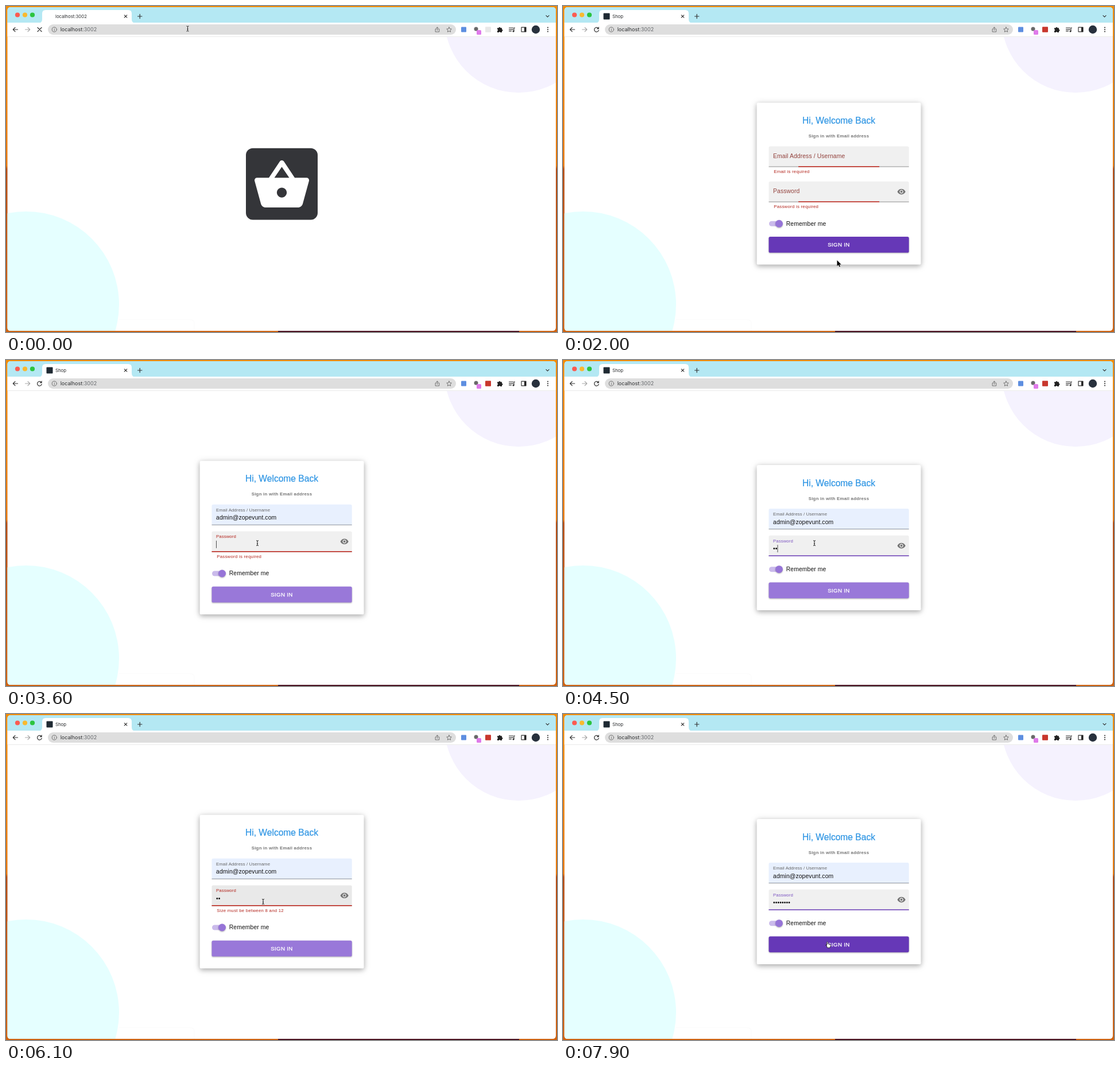
Animation, 960 px wide and 568 px high, one loop 8000 ms. Source, as an HTML page:

```html
<!DOCTYPE html>
<html lang="en">
<head>
<meta charset="utf-8">
<title>Shop sign in</title>
<style>
  html, body { margin: 0; width: 100%; height: 100%; overflow: hidden; }
  svg { display: block; width: 960px; height: 568px; }
  text { font: 10.4px "Liberation Sans", Arial, sans-serif; letter-spacing: .00938em; }
  .ui { font-family: Inter, Roboto, sans-serif; letter-spacing: 0; fill: #2b2d2f; }
  .small { font-size: 7.8px; letter-spacing: .0333em; }
  .line { fill: none; stroke: #333; stroke-width: 1.2; stroke-linecap: round; stroke-linejoin: round; }
  #card { filter: drop-shadow(0 3px 4px rgba(0,0,0,.24)) drop-shadow(0 1px 6px rgba(0,0,0,.14)); }
  .raised { filter: drop-shadow(0 1.3px 1.3px rgba(0,0,0,.3)); }
</style>
</head>
<body>
<svg viewBox="0 0 960 568">
  <defs>
    <linearGradient id="wall" x2="0" y2="1">
      <stop offset="0" stop-color="#f28c08"/>
      <stop offset=".49" stop-color="#e87608"/>
      <stop offset=".5" stop-color="#b54a10"/>
      <stop offset="1" stop-color="#cf6210"/>
    </linearGradient>
    <clipPath id="page"><path d="M2.5 54H958V561Q958 566 953 566H7.5Q2.5 566 2.5 561Z"/></clipPath>
  </defs>

  <rect width="960" height="568" fill="url(#wall)"/>
  <rect x="474" y="560" width="420" height="8" fill="#4a1220"/>
  <rect x="2.5" y="2" width="955.5" height="564" rx="5.5" fill="#fff"/>
  <path d="M2.5 30V7.5Q2.5 2 8 2H952.5Q958 2 958 7.5V30Z" fill="#b4e8f3"/>

  <!-- tab strip -->
  <path d="M57 30Q63 29 63 23V13Q63 7 69 7H213Q219 7 219 13V23Q219 29 225 30Z" fill="#fff"/>
  <rect x="2.5" y="29" width="955.5" height="24" fill="#fff"/>
  <circle cx="20" cy="15.5" r="4.1" fill="#fb5b51"/>
  <circle cx="33" cy="15.5" r="4.1" fill="#f9b92f"/>
  <circle cx="46" cy="15.5" r="4.1" fill="#2bc440"/>
  <rect id="favicon" x="70.5" y="12.5" width="11" height="11" rx="1" fill="#1f2a33"/>
  <text id="tab" class="ui" x="86" y="20.8" style="font-size:7.8px"></text>
  <g class="line">
    <path d="M206.3 15.8l4.4 4.4m0-4.4l-4.4 4.4M229.5 18h7.4M233.2 14.3v7.4M941 16.7l2.5 2.5 2.5-2.5"/>
  </g>

  <!-- toolbar -->
  <rect x="73" y="32" width="711" height="18" rx="9" fill="#dedede"/>
  <g class="line">
    <path d="M20.5 41h-8M16 37.3L12.3 41 16 44.7"/>
    <path d="M33.5 41h8M38 37.3L41.7 41 38 44.7" stroke="#a5a5a5"/>
    <path id="stop" d="M55 37.5l7 7m0-7l-7 7"/>
    <g id="reload"><path d="M61.6 39A3.9 3.9 0 1 0 62.2 42.2"/><path d="M62.4 36.8v3.2h-3.2z" fill="#333" stroke-width=".5"/></g>
    <g stroke="#666" stroke-width=".9">
      <circle cx="84.3" cy="41" r="4.1"/><path d="M84.3 40.7v2.3M84.3 38.9v.1"/>
      <path d="M749.5 40h-1.4v5h6.6v-5h-1.4M751.4 42.5V37m-1.7 1.6l1.7-1.7 1.7 1.7"/>
      <path d="M772 36.9l1.3 2.8 3 .4-2.2 2.1.5 3-2.6-1.5-2.6 1.5.5-3-2.2-2.1 3-.4z"/>
    </g>
    <path d="M876.5 38h7M876.5 40.8h7M876.5 43.6h4M885 44v-6h1.5"/>
    <rect x="898" y="37.2" width="8" height="7.6"/>
  </g>
  <circle cx="884" cy="44" r="1.5" fill="#333"/>
  <path d="M903 37h3v8h-3z" fill="#222"/>
  <text class="ui" x="94.7" y="44.3" style="font-size:9px">localhost<tspan fill="#66696c">:3002</tspan></text>
  <rect x="793" y="36.5" width="9" height="9" rx="1" fill="#5d8ee0"/>
  <circle cx="819" cy="40" r="3.5" fill="#696969"/>
  <rect x="820" y="42" width="8" height="8" rx="1.5" fill="#df7bea"/>
  <rect id="ext" x="835" y="36.2" width="10" height="9.6" rx="1"/>
  <path d="M856 38.3h2.5a1.5 1.5 0 0 1 3 0h2.5v2.5a1.5 1.5 0 0 1 0 3v2.2h-2.7a1.4 1.4 0 0 0-2.7 0H856v-2.7a1.4 1.4 0 0 0 0-2.7z" fill="#222"/>
  <circle cx="923" cy="41" r="7.2" fill="#28313d"/>
  <g fill="#333"><circle cx="944" cy="37.5" r="1.1"/><circle cx="944" cy="41" r="1.1"/><circle cx="944" cy="44.5" r="1.1"/></g>
  <path d="M2.5 53.3H958" stroke="#e3e3e3" stroke-width=".8"/>

  <g clip-path="url(#page)">
    <circle cx="893" cy="22" r="129" fill="#f5f2fe"/>
    <circle cx="35" cy="520" r="162" fill="#e5ffff"/>
    <path d="M197 546.5H321Q328 546.5 328 553V566" fill="none" stroke="#fbfbfb"/>
  </g>

  <g id="splash">
    <rect x="418" y="247.7" width="125" height="124.8" rx="12" fill="#343539"/>
    <path transform="translate(428.7 260.3) scale(4.32)" fill="#fff" d="M17.21 9l-4.38-6.56c-.19-.28-.51-.42-.83-.42-.32 0-.64.14-.83.43L6.79 9H2c-.55 0-1 .45-1 1 0 .09.01.18.04.27l2.54 9.27c.23.84 1 1.46 1.92 1.46h13c.92 0 1.69-.62 1.93-1.46l2.54-9.27L23 10c0-.55-.45-1-1-1h-4.79zM9 9l3-4.4L15 9H9zm3 8c-1.1 0-2-.9-2-2s.9-2 2-2 2 .9 2 2-.9 2-2 2z"/>
  </g>

  <g id="form">
    <rect id="card" x="337.7" width="285.8" rx="2.6" fill="#fff"/>
    <g id="head">
      <text x="480.5" y="219.8" text-anchor="middle" fill="#2a93e3" stroke="#2a93e3" stroke-width=".2" style="font-size:15.6px;letter-spacing:0">Hi, Welcome Back</text>
      <text class="small" x="480.5" y="243.6" text-anchor="middle" fill="#757575" font-weight="700" style="font-weight:700">Sign in with Email address</text>
    </g>
    <g id="email"></g>
    <g id="pass"></g>
    <g id="foot">
      <rect id="track" x="359" y="360.2" width="23.5" height="9" rx="4.5"/>
      <circle id="thumb" class="raised" cx="376.5" cy="364.7" r="6.5"/>
      <text id="remember" x="388.7" y="368.2">Remember me</text>
      <rect id="button" x="358.5" y="387.4" width="244.2" height="27.8" rx="2.6"/>
      <text id="signin" x="480.4" y="404.5" text-anchor="middle" fill="#fff" stroke="#fff" stroke-width=".3" style="font-size:9.75px;letter-spacing:.0286em">SIGN IN</text>
      <circle id="spinner" cx="480.2" cy="401.3" r="6.6" fill="none" stroke="#a3a3a3" stroke-width="1.1" pathLength="360"/>
    </g>
  </g>

  <g id="pointer">
    <path id="arrow" d="M0 0V10.2L2.4 8 4 11.6 5.6 10.9 4.1 7.4H7.3Z" stroke="#fff" stroke-width=".8" paint-order="stroke"/>
    <path id="beam" d="M-2-4.5Q0-4.5 0-3V3Q0 4.5-2 4.5M2-4.5Q0-4.5 0-3M0 3Q0 4.5 2 4.5M-1 .8H1" fill="none" stroke="#111" stroke-width=".9"/>
    <path id="hand" d="M-2.4 1V-4.4Q-1.5-5.9-.6-4.4V-1.2Q.5-2 1-.9 2-1.6 2.5-.5 4-.9 4 .8V2.6Q3.8 4.2 3 5.2H-1.6Q-3-.2-4.4 1 -4.6-.5-2.4 1Z" fill="#fff" stroke="#111" stroke-width=".8" stroke-linejoin="round"/>
  </g>
</svg>

<script>
const LOOP = 8000, STEP = 100, ROW = 14.6;
const ERROR_AT = 1950, FILL_AT = 3000, FOCUS_AT = 3400, TYPE_AT = 4300;
const SEND_AT = 4700, REPLY_AT = 5500, REFOCUS_AT = 6200, RETYPE_AT = 6400;
const GRAY = [102, 102, 102], RED = [179, 38, 30], PURPLE = [126, 87, 194];
const CARET = [[3400, 3800], [4100, 4700], [6200, 7000], [7400, 7800]];
const PATH = [
  [1000, 316.5, 39.5], [1600, 478, 398], [1900, 478, 405], [2000, 477.5, 443],
  [2300, 473, 467], [2500, 473, 467], [2800, 430, 262], [3200, 430, 264],
  [3500, 438, 319], [4500, 438, 319], [4900, 767, 366], [5500, 767, 366],
  [6000, 448, 327], [7400, 448, 327], [7800, 462, 402]
];

const $ = id => document.getElementById(id);
const set = (id, attrs) => { for (const k in attrs) $(id).setAttribute(k, attrs[k]); };
const show = (id, on) => set(id, { visibility: on ? 'inherit' : 'hidden' });
const shift = (id, y) => set(id, { transform: `translate(0 ${y})` });
const clamp = v => Math.min(1, Math.max(0, v));
const within = (t, a, b) => t >= a && t < b;
const lerp = (a, b, k) => a + (b - a) * k;
const rgb = c => `rgb(${c.map(Math.round)})`;
const mix = (a, b, k) => rgb(a.map((v, i) => lerp(v, b[i], k)));

// cubic-bezier(0, 0, .2, 1)
function easeOut(x) {
  let lo = 0, hi = 1;
  for (let i = 0; i < 18; i++) {
    const s = (lo + hi) / 2;
    if (.6 * (1 - s) * s * s + s ** 3 < x) lo = s; else hi = s;
  }
  return 3 * (1 - lo) * lo * lo + lo ** 3;
}
const ramp = (t, start, length = 200) => easeOut(clamp((t - start) / length));
const pulse = (t, on, off, length) => ramp(t, on, length) - ramp(t, off, length);

function buildField(id, y, label) {
  $(id).innerHTML = `
    <path id="${id}Bg" d="M358.5 ${y + 36}v-33.4q0-2.6 2.6-2.6h239q2.6 0 2.6 2.6v33.4z"/>
    <path id="${id}Base" d="M358.5 ${y + 35.6}h244.2" stroke="#000" stroke-opacity=".45" stroke-width=".9"/>
    <rect id="${id}Bar" y="${y + 34.7}" height="1.5"/>
    <text id="${id}Label" x="366">${label}</text>
    <text id="${id}Value" x="366" y="${y + 26.6}"></text>
    <path id="${id}Caret" d="M0 ${y + 16.4}v13" stroke="#222" stroke-width=".8"/>
    <text id="${id}Help" class="small" x="367.2" y="${y + 46.7}" fill="${rgb(RED)}"></text>`;
}

function drawField(id, y, s) {
  const half = 122.1 * s.bar;
  set(id + 'Bg', { fill: s.bg });
  set(id + 'Base', { 'stroke-dasharray': s.off ? '.8 .8' : 'none' });
  set(id + 'Bar', { x: 480.6 - half, width: 2 * half, fill: s.barColor });
  set(id + 'Label', { y: y + lerp(20.6, 11.9, s.shrink), fill: s.color });
  $(id + 'Label').style.fontSize = lerp(10.4, 7.8, s.shrink) + 'px';
  $(id + 'Value').textContent = s.value;
  set(id + 'Value', { fill: s.off ? '#96989c' : '#111' });
  set(id + 'Caret', { transform: `translate(${s.caretX || 366.5} 0)` });
  show(id + 'Caret', s.caret);
  $(id + 'Help').textContent = s.help;
}

function pointerAt(t) {
  let i = 0;
  while (i < PATH.length - 2 && t >= PATH[i + 1][0]) i++;
  const [a, b] = [PATH[i], PATH[i + 1]];
  const k = clamp((t - a[0]) / (b[0] - a[0])), e = k * k * (3 - 2 * k);
  return [lerp(a[1], b[1], e), lerp(a[2], b[2], e)];
}

function typedCount(t) {
  if (t < TYPE_AT) return 0;
  if (t < RETYPE_AT) return t < TYPE_AT + 100 ? 1 : 2;
  return Math.min(8, 3 + Math.floor((t - RETYPE_AT) / 80));
}

function draw(t) {
  const loaded = t >= 300, ready = t >= 600, busy = within(t, SEND_AT, REPLY_AT);
  const emailBad = within(t, ERROR_AT, FILL_AT);
  const replyBad = within(t, REPLY_AT, RETYPE_AT);
  const passBad = within(t, ERROR_AT, TYPE_AT) || replyBad;
  const rows = emailBad + passBad, top = -ROW / 2 * rows;
  const passY = top + ROW * emailBad, footY = ROW / 2 * rows;

  $('tab').textContent = loaded ? 'Shop' : 'localhost:3002';
  show('favicon', loaded);
  show('reload', loaded);
  show('stop', !loaded);
  set('ext', { fill: loaded ? '#c8372d' : '#e8e8e8' });
  show('splash', !ready);
  show('form', ready);

  set('card', { y: 183 + top, height: 253 + ROW * rows });
  shift('head', top);
  shift('email', top);
  shift('pass', passY);
  shift('foot', footY);

  const [px, py] = pointerAt(t);
  const over = (y, h) => ready && px > 358 && px < 603 && py > y && py < y + h;
  const overEmail = over(259 + top, 36), overPass = over(305.7 + passY, 36);
  const overButton = over(387.4 + footY, 28);

  const filled = t >= FILL_AT;
  const errorMix = ramp(t, ERROR_AT);
  drawField('email', 259, {
    bg: filled ? '#e8f0fe' : overEmail && t < 2700 ? '#e8e8e8' : '#f0f0f0',
    bar: pulse(t, ERROR_AT, FILL_AT), barColor: '#c4271d',
    shrink: ramp(t, 2700), color: emailBad ? mix(GRAY, RED, errorMix) : rgb(GRAY),
    value: filled ? 'admin@zopevunt.com' : '', off: busy,
    caret: within(t, 2700, FILL_AT), help: emailBad ? 'Email is required' : ''
  });

  const focus = within(t, FOCUS_AT, SEND_AT) || t >= REFOCUS_AT;
  const count = typedCount(t);
  drawField('pass', 305.7, {
    bg: busy ? '#e0e0e0' : overPass && !focus ? '#e9e9e9' : '#f0f0f0',
    bar: pulse(t, ERROR_AT, SEND_AT) + ramp(t, REPLY_AT),
    barColor: passBad ? '#c4271d' : '#7448c0',
    shrink: ramp(t, FOCUS_AT),
    color: passBad ? mix(GRAY, RED, replyBad ? ramp(t, REPLY_AT) : errorMix) : rgb(focus ? PURPLE : GRAY),
    value: '•'.repeat(count), off: busy,
    caret: CARET.some(([a, b]) => within(t, a, b)), caretX: 366.5 + 3.74 * count,
    help: replyBad ? 'Size must be between 8 and 12' : passBad ? 'Password is required' : ''
  });

  const hover = pulse(t, 1500, 2000, 250) + ramp(t, 7500, 250);
  set('track', { fill: busy ? '#f1ecfa' : '#cabaeb' });
  set('thumb', { fill: busy ? '#d5c9ee' : '#9674d7', class: busy ? '' : 'raised' });
  set('remember', { fill: busy ? '#9e9e9e' : '#111' });
  set('button', {
    fill: busy ? '#e0e0e0' : mix([153, 120, 217], [102, 56, 183], hover),
    class: busy ? '' : 'raised'
  });
  show('signin', !busy);
  show('spinner', busy);
  if (busy) {
    const turn = (t - 5000) / 1400, phase = (turn + 1.17) % 1;
    const grow = clamp(phase * 2), fall = clamp(phase * 2 - 1);
    const from = 42 * grow + 312 * fall;
    const arc = Math.max(3, Math.min(284 * grow * (1.4 - .4 * grow), 360 - from) - 42 * grow * (1 - fall));
    set('spinner', {
      'stroke-dasharray': `${Math.min(arc, 284)} 720`,
      transform: `rotate(${85 + 360 * turn + from - 14} 480.2 401.3)`
    });
  }

  const beam = overEmail || overPass || py < 53, hand = overButton && !busy;
  set('pointer', { transform: `translate(${px} ${py})` });
  show('beam', beam);
  show('hand', hand);
  show('arrow', !beam && !hand);
}

buildField('email', 259, 'Email Address / Username');
buildField('pass', 305.7, 'Password');
$('pass').insertAdjacentHTML('beforeend', `<path transform="translate(581.9 315.8) scale(.645)" fill="#757575" d="M12 4.5C7 4.5 2.73 7.61 1 12c1.73 4.39 6 7.5 11 7.5s9.27-3.11 11-7.5c-1.73-4.39-6-7.5-11-7.5zM12 17c-2.76 0-5-2.24-5-5s2.24-5 5-5 5 2.24 5 5-2.24 5-5 5zm0-8c-1.66 0-3 1.34-3 3s1.34 3 3 3 3-1.34 3-3-1.34-3-3-3z"/>`);

const start = performance.now();
function tick() {
  const t = (performance.now() - start) % LOOP;
  draw(Math.floor(t / STEP) * STEP);
  requestAnimationFrame(tick);
}
tick();
</script>
</body>
</html>
```
